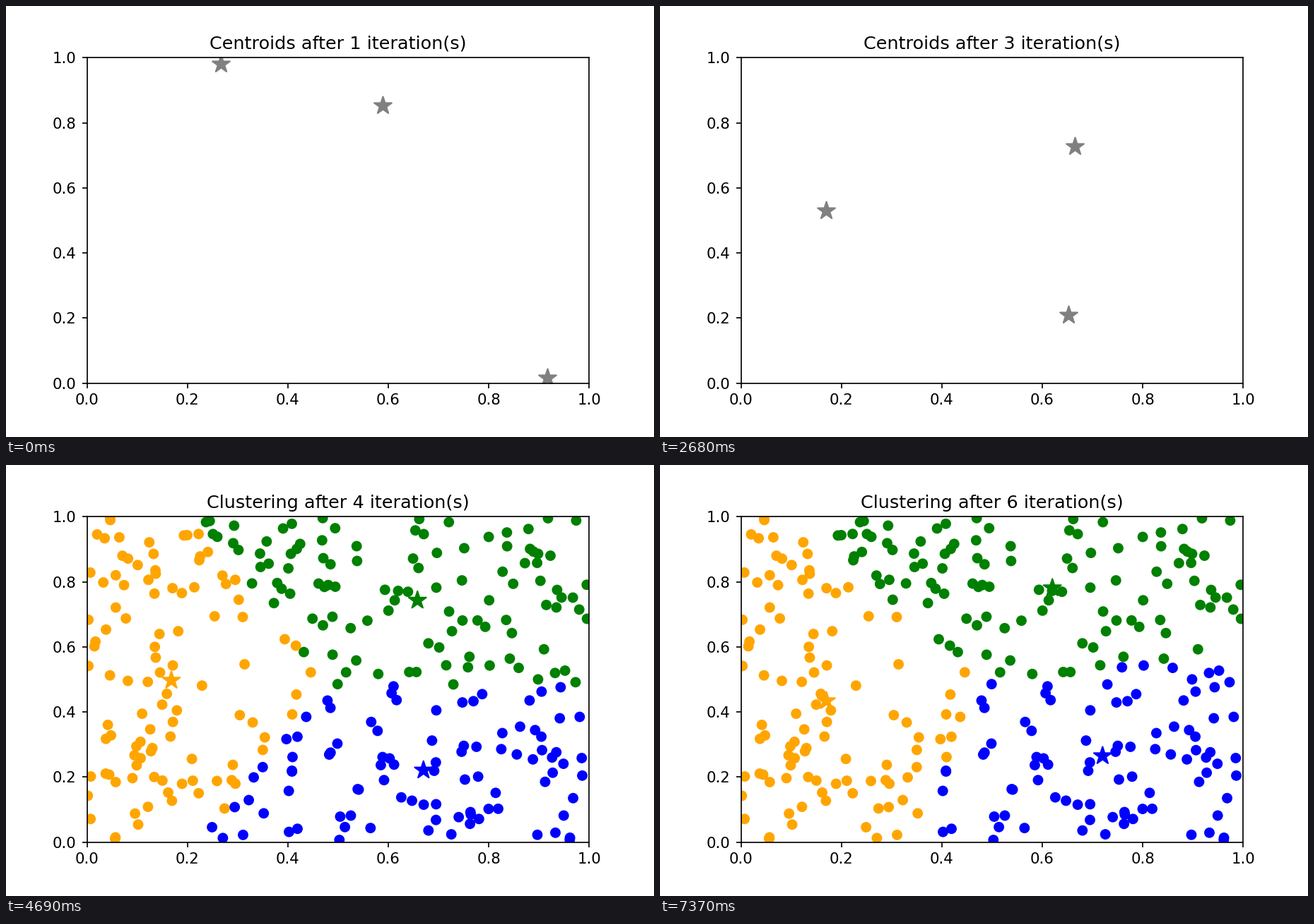
Write a matplotlib script that moves like this. It is 917 by 611 pixels and loops after 8000 ms.

```python
import numpy as np
import matplotlib.pyplot as plt
from matplotlib.animation import FuncAnimation

DPI = 152.8
LOOP, TICK, HOLD = 8000, 50, 670  # milliseconds
EPS = 1e-6  # keeps the pixel size from rounding down
N_POINTS = 300
COLORS = np.array(["orange", "green", "blue"])

# Key positions per iteration: orange, green, blue
CENTROIDS = np.array([
    [(.266, .982), (.589, .854), (.917, .016)],
    [(.158, .613), (.610, .681), (.634, .213)],
    [(.169, .530), (.664, .727), (.652, .210)],
    [(.168, .497), (.658, .743), (.670, .221)],
    [(.167, .463), (.642, .760), (.701, .245)],
    [(.170, .434), (.620, .781), (.720, .265)],
])


def nearest(points, centers):
    gaps = points[:, None] - centers
    return np.hypot(gaps[..., 0], gaps[..., 1]).argmin(axis=1)


points = np.random.default_rng(12).random((N_POINTS, 2))

plt.rcParams.update({"font.family": "DejaVu Sans", "font.size": 10})
fig, ax = plt.subplots(figsize=((917 + EPS) / DPI, (611 + EPS) / DPI), dpi=DPI)
fig.subplots_adjust(left=0.125, right=0.9, bottom=0.125, top=0.88)
ax.set(xlim=(0, 1), ylim=(0, 1))
title = ax.set_title("")
dots = ax.scatter(*points.T, s=36)
stars = ax.scatter(*CENTROIDS[0].T, s=150, marker="*")


def update(i):
    # A change falling inside a tick shows from the start of that tick
    step = (i * TICK + TICK - 1) // HOLD
    n, clustered = divmod(step, 2)
    centers = CENTROIDS[n]
    stars.set_offsets(centers)
    stars.set_color(COLORS if clustered else "gray")
    dots.set_visible(bool(clustered))
    dots.set_color(COLORS[nearest(points, centers)])
    stage = "Clustering" if clustered else "Centroids"
    title.set_text(f"{stage} after {n + 1} iteration(s)")
    return dots, stars, title


anim = FuncAnimation(fig, update, frames=LOOP // TICK, interval=TICK,
                     repeat=True, repeat_delay=0, blit=False)
plt.show()
```
